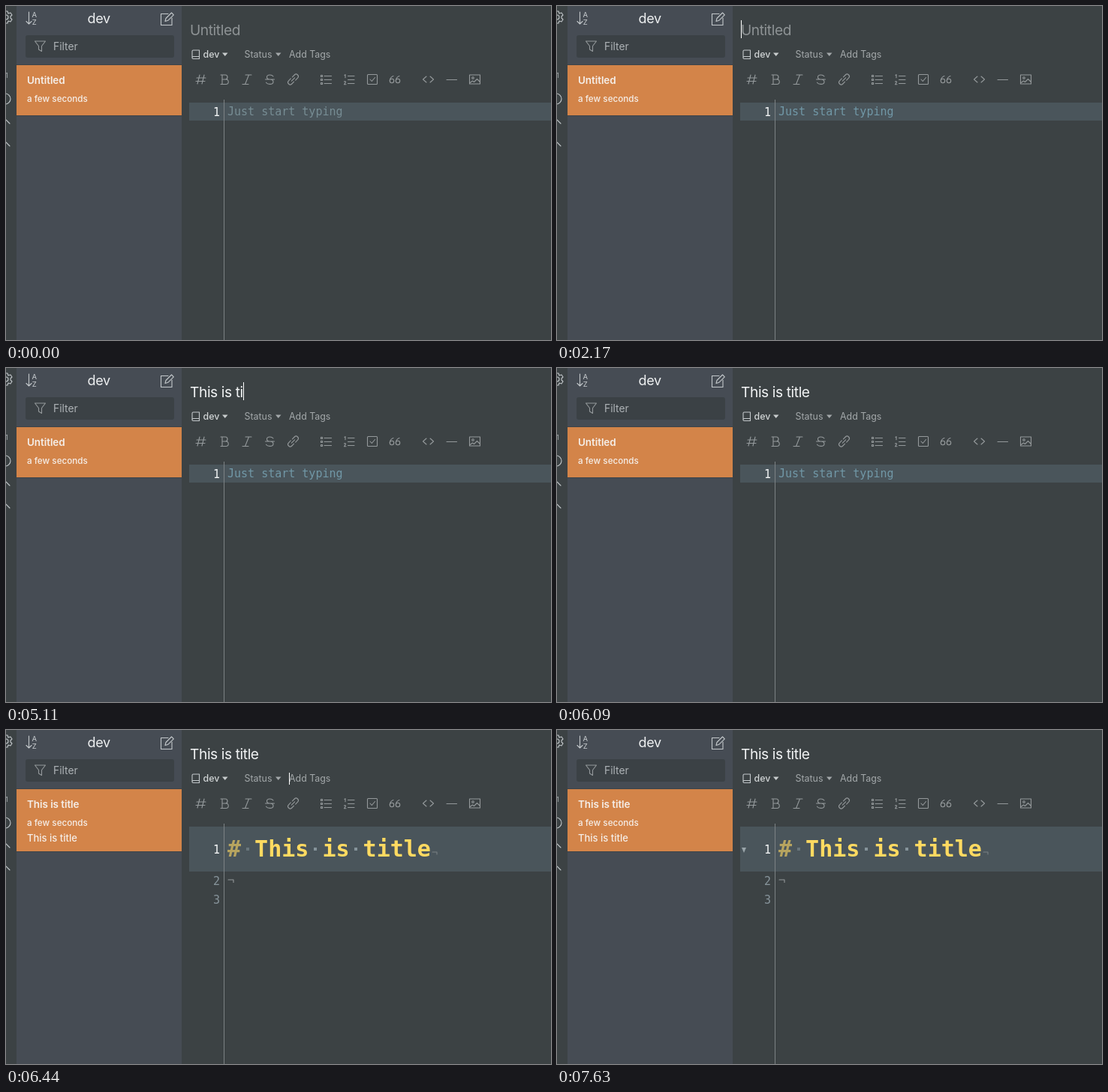
Recreate the animation shown at these times as an HTML page. Size 726 by 446 pixels, loop 7700 ms.

```html
<!DOCTYPE html>
<html lang="en">
<head>
<meta charset="utf-8">
<title>Note editor</title>
<style>
  html, body { margin: 0; width: 100%; height: 100%; overflow: hidden; background: #3c4244; }
  svg { position: absolute; left: 0; top: 0; display: block; }
  text { font-family: Inter, sans-serif; white-space: pre; }
  .mono { font-family: "DejaVu Sans Mono", monospace; font-size: 15px; }
  .num { fill: #87949b; }
  .head { font-size: 30px; font-weight: 700; fill: #ffda61; }
  .meta { font-size: 12.4px; fill: #a3a8aa; }
  .line { fill: none; stroke: #94999b; stroke-width: 1.1; stroke-linecap: round; stroke-linejoin: round; }
  .bright { stroke: #c3c8cb; }
  #title {
    position: absolute; left: 245px; top: 20px; height: 24px;
    font: 400 19.2px/24px Inter, sans-serif; letter-spacing: -.022em;
    white-space: pre; color: #f1f3f4;
  }
  #title.empty { color: #8e9395; }
  #caret { position: absolute; top: -1px; right: -1px; width: 1px; height: 24px; background: #fff; }
  .empty #caret { left: 0; }
</style>
</head>
<body>
<svg width="726" height="446" viewBox="0 0 726 446">
  <rect width="726" height="446" fill="#3c4244"/>
  <rect x="14" width="220" height="446" fill="#464c54"/>

  <!-- left rail -->
  <g class="line bright">
    <circle cx="0" cy="15" r="3"/>
    <path d="M0 7h2l1 3 3-1 2 3-2 2v2l2 2-2 3-3-1-1 3H0"/>
    <circle cx="-1" cy="124" r="7"/>
    <path d="M0 152l5 5M0 182l5 5"/>
  </g>
  <text x="-1" y="96" font-size="9.5" fill="#a4a9ac">1</text>

  <!-- note list header -->
  <g class="line bright">
    <path d="M30.5 8v16M27 20.5l3.500 3.500 3.500-3.500"/>
    <path d="M216 10.500h-9.500v15h14.500v-9.500"/>
    <path d="M212 20.500l1-4 7.500-7.500 2.800 2.800-7.500 7.500z"/>
  </g>
  <g font-size="9.5" fill="#c9cdd0">
    <text x="34.500" y="15">A</text>
    <text x="34.700" y="25">Z</text>
  </g>
  <text x="108.500" y="22.500" font-size="18" letter-spacing="-.3" fill="#eef0f1">dev</text>
  <rect x="26" y="39" width="198" height="30" rx="3" fill="#3b4145"/>
  <path class="line" d="M38.500 47h14l-5 6.500v7l-4-2.500v-4.500z"/>
  <text x="63" y="59" font-size="13.8" fill="#aeb3b6">Filter</text>

  <!-- selected note -->
  <rect x="14" y="78" width="220" height="1" fill="#3d4349"/>
  <rect id="tile" x="14" y="79" width="220" height="67" fill="#d38449"/>
  <rect id="edge" x="14" y="146" width="220" height="1" fill="#3d4349"/>
  <g fill="#f5eee8">
    <text id="name" x="28" y="104" font-size="13.5" font-weight="600" letter-spacing="-.08"></text>
    <text x="28" y="128" font-size="11.7" font-weight="500">a few seconds</text>
    <text id="snippet" x="28" y="148.500" font-size="13" font-weight="500">This is title</text>
  </g>

  <!-- note properties -->
  <path class="line bright" d="M248 69.500v-9q0-1.500 1.500-1.500h8v11.500h-8q-1.500 0-1.500-1.500t1.500-1.500h8"/>
  <g class="meta">
    <text x="262.500" y="69" font-weight="500" fill="#d0d4d5">dev</text>
    <text x="317.500" y="69">Status</text>
    <text x="377" y="69">Add Tags</text>
  </g>
  <path d="M288 62.500h7.500l-3.750 4.500z" fill="#c9cdce"/>
  <path d="M359 62.500h7.500l-3.750 4.500z" fill="#a3a8aa"/>
  <rect id="tagCaret" x="377" y="57" width="1" height="16" fill="#fff"/>

  <!-- toolbar -->
  <g class="line">
    <path d="M258 92l-3 12M264 92l-3 12M254 96h12M253 100.500h12"/>
    <path d="M286 92h6a3 3 0 0 1 0 6h-4h5a3 3 0 0 1 0 6.500h-7M288 92v12.500"/>
    <path d="M319 92h8M315 104.500h8M323.500 92l-5 12.500"/>
    <path d="M356 94q-1.500-2-4.500-2-4 0-4 3t4 3q4.500 0 4.500 3.200t-4.500 3.200q-3.500 0-5-2.200M345.500 98h12"/>
    <g transform="rotate(-45 382.500 98)">
      <path d="M381 95h-4a3 3 0 0 0 0 6h4M384 95h4a3 3 0 0 1 0 6h-4M379.500 98h6"/>
    </g>
    <path d="M424 93.500h9.500M424 98.500h9.500M424 103.500h9.500"/>
    <path d="M419.500 92.500h2v2h-2zM419.500 97.500h2v2h-2zM419.500 102.500h2v2h-2z"/>
    <path d="M455.500 93.500h8.500M455.500 98.500h8.500M455.500 103.500h8.500M451 92.500l1-.8v4M450.500 101q2-1 2 .8l-2 3h2.500"/>
    <rect x="481.500" y="91.500" width="13" height="13" rx="1"/>
    <path d="M485 98l2.300 2.500 4.200-5"/>
    <circle cx="514" cy="100" r="2.700"/>
    <circle cx="522" cy="100" r="2.700"/>
    <path d="M511.300 99.500q.5-4.500 4.700-6M519.300 99.500q.5-4.500 4.700-6"/>
    <path d="M560 94l-4.500 4 4.500 4M565 94l4.500 4-4.500 4M587 98.500h13.500"/>
    <rect x="617.500" y="92" width="14" height="12"/>
    <circle cx="622" cy="96" r="1.300"/>
    <path d="M618 102.500l3.500-2.500 2 1.500 4-4 3.500 3.500"/>
  </g>

  <!-- editor -->
  <rect id="active" x="244" y="129" width="482" height="24" fill="#4a555b"/>
  <rect x="290" y="125" width="1" height="321" fill="#7c8284"/>
  <text id="one" class="mono" x="276" fill="#f5f7f8">1</text>
  <text id="hint" class="mono" x="295" y="146">Just start typing</text>
  <g id="body">
    <text class="mono head" x="295" y="169"><tspan fill="#b7a45f">#</tspan> This is title</text>
    <g fill="#85939a">
      <rect x="320" y="157" width="4" height="4" fill="#69767c"/>
      <rect x="410" y="157" width="4" height="4"/>
      <rect x="464" y="157" width="4" height="4"/>
    </g>
    <path class="line" d="M568 163h6v3" stroke-opacity=".65"/>
    <path class="line" d="M296 200h7v3.500"/>
    <text class="mono num" x="276" y="207">2</text>
    <text class="mono num" x="276" y="231.500">3</text>
  </g>
  <path id="fold" d="M246 157h6l-3 7z" fill="#99a4a9"/>
</svg>
<div id="title"><span id="typed"></span><i id="caret"></i></div>

<script>
  const LOOP = 7700, BLINK = 490;
  const TEXT = 'This is title';
  const KEYS = [2380, 2870, 3220, 3430, 3850, 4060, 4130, 4690, 4970, 5110, 5320, 5390, 5600];
  const TAB = 6160, SAVED = 6230, FOLD = 6800;

  const $ = id => document.getElementById(id);
  const show = (id, on) => { $(id).style.visibility = on ? 'visible' : 'hidden'; };
  const lit = age => age >= 0 && Math.floor(age / BLINK) % 2 === 0;

  function draw(t) {
    const count = KEYS.filter(k => k <= t).length;
    const moved = t >= TAB, saved = t >= SAVED;

    $('typed').textContent = count ? TEXT.slice(0, count) : 'Untitled';
    $('title').className = count ? '' : 'empty';
    show('caret', !moved && lit(t - (count ? KEYS[count - 1] : 1050)));
    show('tagCaret', moved && lit(t - TAB));

    $('active').setAttribute('height', moved ? 60 : 24);
    $('one').setAttribute('y', moved ? 165 : 147);
    $('hint').setAttribute('fill', t < 210 ? '#778d94' : '#7198a7');
    show('hint', !moved);
    show('body', moved);
    show('fold', t >= FOLD);

    $('name').textContent = saved ? TEXT : 'Untitled';
    $('tile').setAttribute('height', saved ? 83 : 67);
    $('edge').setAttribute('y', saved ? 162 : 146);
    show('snippet', saved);
  }

  function tick() {
    draw(performance.now() % LOOP);
    requestAnimationFrame(tick);
  }
  tick();
</script>
</body>
</html>
```
